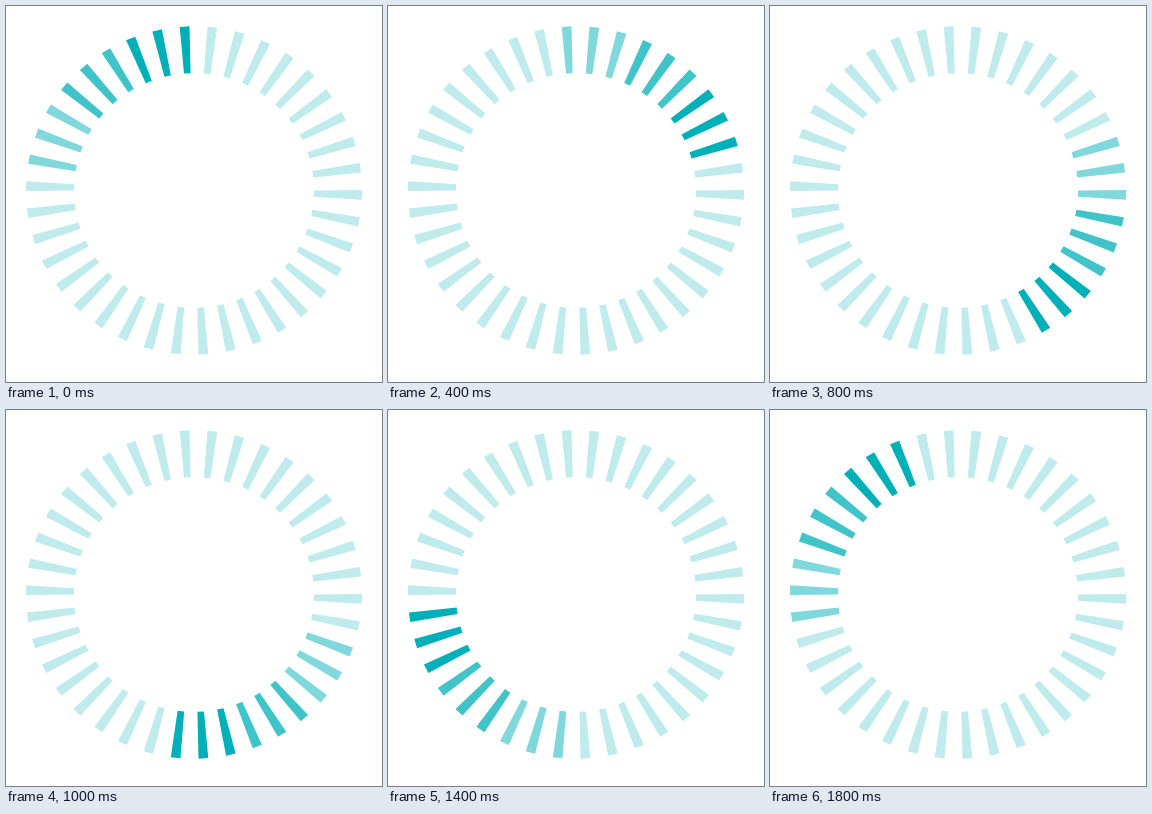
An HTML page with a canvas that plays this animation: 376x376 px, repeating every 1.9 s.

```html
<!DOCTYPE html>
<html lang="en">
<head>
<meta charset="utf-8">
<title>Spinner</title>
<style>
  html, body { margin: 0; width: 100%; height: 100%; overflow: hidden; background: #fff; }
  canvas { display: block; width: 376px; height: 376px; }
</style>
</head>
<body>
<canvas id="stage"></canvas>
<script>
const SIZE = 376, LOOP = 1900, STEP = 100;
const SPOKES = 38, SPOKES_PER_STEP = 2, BAND = 3;
const CENTER = { x: 188, y: 184.5 }, SQUASH = 0.977;
const INNER = { r: 120, half: 3.3 }, OUTER = { r: 168, half: 4.9 };
const START_ANGLE = -3.2 * Math.PI / 180;
const TRAIL = ['#00b0b8', '#40c4ca', '#80d8dc'], REST = '#bfebed';

const canvas = document.getElementById('stage');
const ctx = canvas.getContext('2d');
const ratio = window.devicePixelRatio || 1;
canvas.width = canvas.height = SIZE * ratio;

function drawSpoke(index, color) {
  ctx.save();
  ctx.translate(CENTER.x, CENTER.y);
  ctx.scale(1, SQUASH);
  ctx.rotate(START_ANGLE + index * 2 * Math.PI / SPOKES);
  ctx.beginPath();
  ctx.moveTo(-INNER.half, -INNER.r);
  ctx.lineTo(-OUTER.half, -OUTER.r);
  ctx.lineTo(OUTER.half, -OUTER.r);
  ctx.lineTo(INNER.half, -INNER.r);
  ctx.closePath();
  ctx.fillStyle = color;
  ctx.fill();
  ctx.restore();
}

function draw(time) {
  const head = Math.floor((time % LOOP) / STEP) * SPOKES_PER_STEP;
  ctx.setTransform(ratio, 0, 0, ratio, 0, 0);
  ctx.fillStyle = '#fff';
  ctx.fillRect(0, 0, SIZE, SIZE);
  for (let i = 0; i < SPOKES; i++) {
    const behind = (head - i + SPOKES) % SPOKES;
    drawSpoke(i, TRAIL[Math.floor(behind / BAND)] || REST);
  }
}

const start = performance.now();
function tick() {
  draw(performance.now() - start);
  requestAnimationFrame(tick);
}
tick();
</script>
</body>
</html>
```
